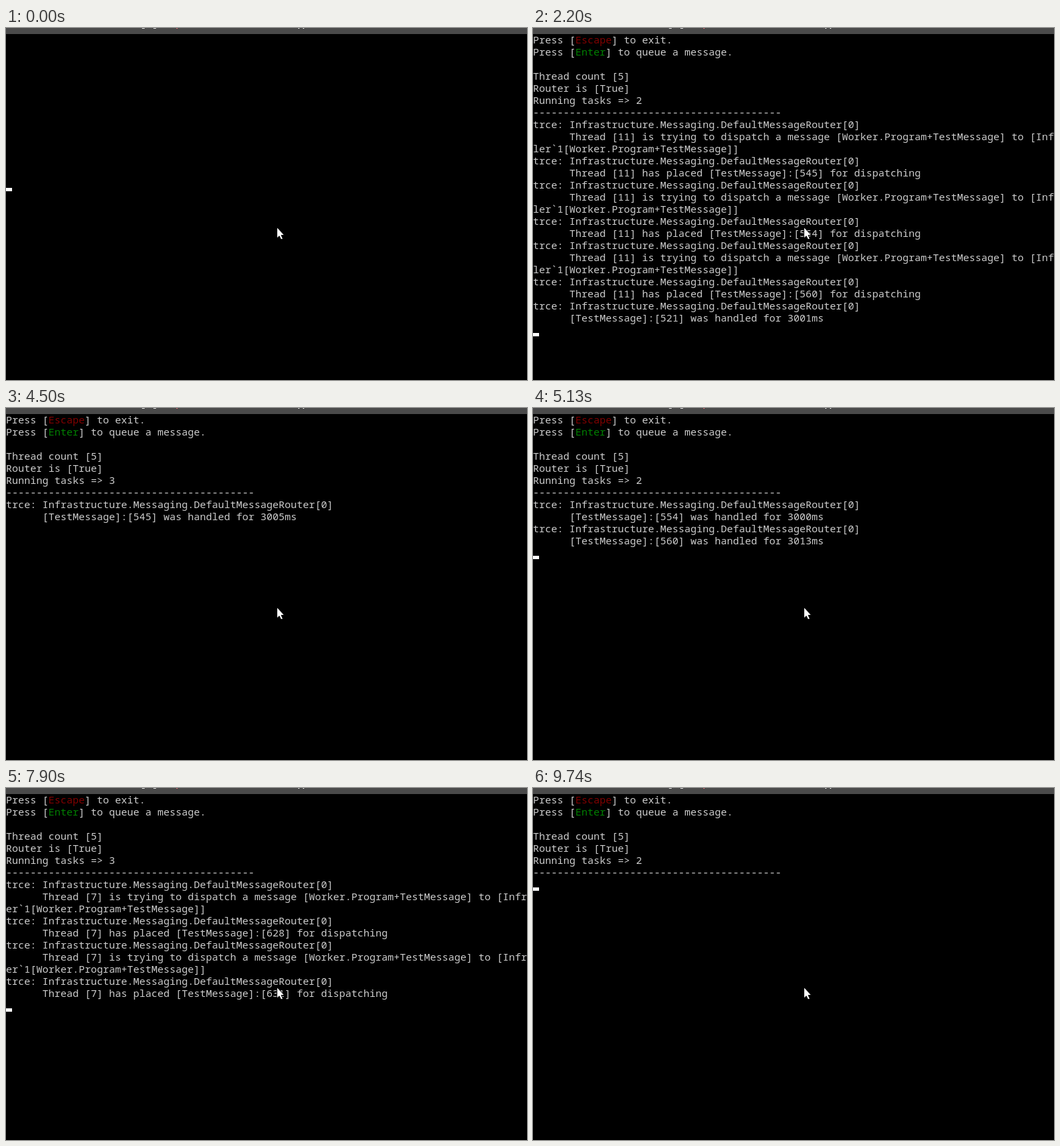
An HTML page for the animation above (9800 ms loop, 774 by 524 pixels).

```html
<!DOCTYPE html>
<html lang="en">
<head>
<meta charset="utf-8">
<title>Message router console</title>
<style>
  html, body { margin: 0; width: 100%; height: 100%; overflow: hidden; background: #000; }
  #stage { position: relative; width: 774px; height: 524px; overflow: hidden; background: #000; }
  #stage > * { position: absolute; left: 0; margin: 0; }
  #text { top: 8px; color: #ccc; white-space: pre; font: 15px/18px "Noto Sans Mono", "DejaVu Sans Mono", monospace; }
  #text i { font-style: normal; color: #800000; }
  #text b { font-weight: normal; color: #008000; }
  #cursor { width: 9px; height: 5px; background: #fff; }
  svg { top: 0; }
</style>
</head>
<body>
<div id="stage">
  <pre id="text"></pre>
  <div id="cursor"></div>
  <svg width="774" height="524">
    <path fill="#4a4a4a" d="M0 0H774V9H0Z"/>
    <path fill="#ddd" d="M202 0h4v1h-4zM219 0h4v1h-4zM434 0h2v1h-2zM441 0h2v1h-2z"/>
    <path fill="#e06c75" d="M253 0h2v1h-2z"/>
    <path fill="#fff" stroke="#000" d="M402.5 296.5V313L406 309.7L408.6 315L411.4 313.8L409 308.5H413.6Z"/>
  </svg>
</div>
<script>
const LOOP = 9800, COLUMNS = 86, HEAD_ROWS = 7;
const text = document.getElementById("text");
const cursor = document.getElementById("cursor");

const source = "trce: Infrastructure.Messaging.DefaultMessageRouter[0]";
const indent = " ".repeat(6);

// Each action changes the console state
const append = (s, lines) => { s.body.push(...lines); s.row = HEAD_ROWS + s.body.length; s.on = true; };
const wipe = () => s => { s.blank = true; };
const head = (tasks, threads = 5, on = true) => s =>
  Object.assign(s, { tasks, threads, on, blank: false, body: [], row: HEAD_ROWS });
const blink = on => s => { s.on = on; };
const send = (thread, id) => s => append(s, [
  source,
  `${indent}Thread [${thread}] is trying to dispatch a message [Worker.Program+TestMessage] to [Infrastructure`.slice(0, COLUMNS),
  (thread < 10 ? "er" : "ler") + "`1[Worker.Program+TestMessage]]",
  source,
  `${indent}Thread [${thread}] has placed [TestMessage]:[${id}] for dispatching`
]);
const done = (id, ms) => s => append(s, [source, `${indent}[TestMessage]:[${id}] was handled for ${ms}ms`]);

const script = [
  [60, head(1)],
  [560, send(11, 533)],
  [1210, wipe()],
  [1270, head(2)],
  [1580, send(11, 545)],
  [2100, send(11, 554)],
  [2200, send(11, 560), done(521, 3001)],
  [2450, wipe()],
  [2500, head(4)],
  [3370, blink(false)],
  [3520, done(533, 3002)],
  [3670, head(3)],
  [4380, blink(false)],
  [4470, done(545, 3005), blink(false)],
  [4560, blink(true)],
  [4830, wipe()],
  [4890, head(2)],
  [5010, done(554, 3000)],
  [5130, done(560, 3013)],
  [5630, send(4, 602)],
  [5810, send(4, 605)],
  [6090, head(2, 6), send(4, 608)],
  [6990, blink(false)],
  [7270, wipe()],
  [7320, head(3)],
  [7780, send(7, 628)],
  [7900, send(7, 631)],
  [8520, head(5)],
  [8580, done(602, 3001)],
  [8730, done(605, 3004)],
  [8980, done(608, 3000)],
  [9630, head(2, 5, false)],
  [9740, blink(true)]
];

function stateAt(t) {
  const s = { blank: true, on: true, row: 12, body: [] };
  for (const [start, ...actions] of script) {
    if (start > t) break;
    actions.forEach(act => act(s));
  }
  return s;
}

const render = s => s.blank ? "" : [
  "Press [<i>Escape</i>] to exit.",
  "Press [<b>Enter</b>] to queue a message.",
  "",
  `Thread count [${s.threads}]`,
  "Router is [True]",
  `Running tasks =&gt; ${s.tasks}`,
  "-".repeat(41),
  ...s.body
].join("\n");

let shown = null;
function draw(now) {
  const s = stateAt(now % LOOP);
  const html = render(s);
  if (html !== shown) text.innerHTML = shown = html;
  cursor.style.top = 22 + 18 * s.row + "px";
  cursor.hidden = !s.on;
  requestAnimationFrame(draw);
}
draw(performance.now());
</script>
</body>
</html>
```
